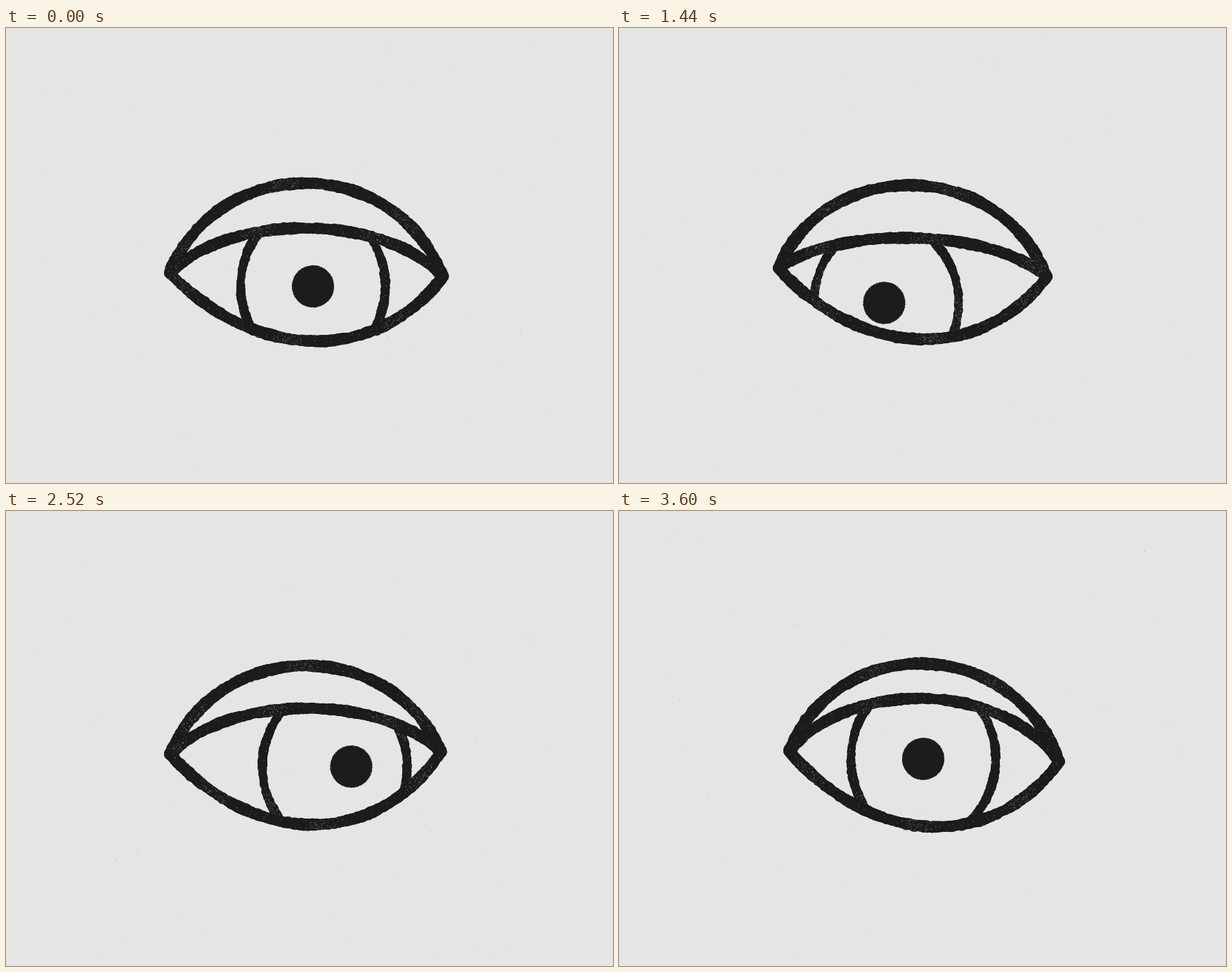
Write an HTML page with a canvas that moves like this. It is 864x648 px and loops after 3780 ms.

```html
<!DOCTYPE html>
<html lang="en">
<head>
<meta charset="utf-8">
<title>Eye</title>
<style>
  html, body { margin: 0; width: 100%; height: 100%; overflow: hidden; background: #e5e5e5; }
  canvas { display: block; }
</style>
</head>
<body>
<canvas id="stage" width="864" height="648"></canvas>
<script>
const ctx = document.getElementById('stage').getContext('2d');
const STEP = 180, COUNT = 21;
const INK = '#1c1c1c', PAPER = '#e5e5e5';

// Key poses: lid height, pupil and the two corners; all else follows from them
const poses = [
  { at: 0, lid: 285, pupil: [437, 368], left: [233, 349], right: [622, 354] },
  { at: 3, lid: 261, pupil: [399, 347], left: [227, 352], right: [619, 350] },
  { at: 6, lid: 344, pupil: [397, 432], left: [232, 347], right: [609, 356] },
  { at: 10, lid: 254, pupil: [358, 351], left: [221, 337], right: [609, 353] },
  { at: 12, lid: 292, pupil: [467, 374], left: [228, 342], right: [622, 341] },
  { at: 16, lid: 270, pupil: [516, 354], left: [239, 351], right: [616, 346] },
  { at: 20, lid: 267, pupil: [433, 353], left: [242, 342], right: [627, 357] }
];

function random(seed) {
  let s = seed * 7919 + 17;
  return () => {
    s = (s + 0x6D2B79F5) | 0;
    let t = Math.imul(s ^ (s >>> 15), 1 | s);
    t = (t + Math.imul(t ^ (t >>> 7), 61 | t)) ^ t;
    return ((t ^ (t >>> 14)) >>> 0) / 4294967296;
  };
}

function poseAt(n) {
  const i = Math.max(1, poses.findIndex(p => p.at >= n));
  const a = poses[i - 1], b = poses[i];
  const t = (n - a.at) / (b.at - a.at);
  const k = t * t * (3 - 2 * t);
  const mix = (u, v) => u + (v - u) * k;
  const mixPoint = key => a[key].map((v, d) => mix(v, b[key][d]));
  return {
    lid: mix(a.lid, b.lid),
    pupil: mixPoint('pupil'), left: mixPoint('left'), right: mixPoint('right')
  };
}

// Bezier arch from corner to corner with its middle at height y;
// fa and fb set how far in the handles stand
function arch([x0, y0], [x1, y1], y, fa, fb) {
  const w = x1 - x0, handle = y + (y - (y0 + y1) / 2) / 3;
  const bezier = (t, a, b, c, d) => {
    const u = 1 - t;
    return u * u * u * a + 3 * u * u * t * b + 3 * u * t * t * c + t * t * t * d;
  };
  return Array.from({ length: 241 }, (_, i) => {
    const t = i / 240;
    return [bezier(t, x0, x0 + fa * w, x1 - fb * w, x1), bezier(t, y0, handle, handle, y1)];
  });
}

const oval = (x, y, rx, ry) => Array.from({ length: 360 }, (_, i) => {
  const a = i * Math.PI / 180;
  return [x + rx * Math.cos(a), y + ry * Math.sin(a)];
});

function blob(x, y, r) {
  ctx.beginPath();
  ctx.arc(x, y, r, 0, 7);
  ctx.fill();
}

function trace(line) {
  ctx.beginPath();
  line.forEach(p => ctx.lineTo(...p));
}

// Dry marker stroke: round stamps of uneven size with patches of grain
function marker(line, width, rnd) {
  const phase = rnd() * 6;
  ctx.fillStyle = INK;
  line.forEach(([x, y], i) => {
    const r = width / 2 + 0.5 * Math.sin(i * 0.13 + phase) + (rnd() - 0.5) * 1.3;
    blob(x + rnd() - 0.5, y + rnd() - 0.5, r);
  });
  ctx.fillStyle = 'rgba(229,229,229,.3)';
  line.forEach(([x, y], i) => {
    const dots = Math.sin(i * 0.07 + phase * 2) > 0.75 ? 3 : 0.3;
    for (let k = rnd(); k < dots; k++) {
      ctx.fillRect(x + (rnd() - 0.5) * width, y + (rnd() - 0.5) * width, 1.2, 1.2);
    }
  });
}

function dust(rnd) {
  for (let i = 0; i < 60; i++) {
    ctx.fillStyle = `rgba(60,60,60,${0.04 + 0.14 * rnd()})`;
    blob(30 + rnd() * 780, 8 + rnd() * 632, 0.5 + rnd() * 0.5);
  }
}

function draw(n) {
  const rnd = random(n + 1);
  const { lid, pupil: [px, py], left, right } = poseAt(n);

  // The whole eye flattens a little as the lid comes down
  const drop = (lid - 270) * 0.2;
  const browLine = arch(left, right, 218 + drop, 0.18, 0.18);
  const lidLine = arch(left, right, lid, 0.22, 0.22);
  const rimLine = arch(left, right, 449 - drop, 0.32, 0.24);

  // The iris trails the pupil, more so to the right
  const shift = px - 437;
  const irisX = 437 + shift * (shift < 0 ? 0.95 : 0.57);

  ctx.fillStyle = PAPER;
  ctx.fillRect(0, 0, 864, 648);
  dust(rnd);

  ctx.save();
  trace([...lidLine, ...rimLine.slice().reverse()]);
  ctx.clip();
  marker(oval(irisX, py, 103, 115), 12.5, rnd);
  ctx.fillStyle = INK;
  trace(oval(px, py, 30, 30).map(([x, y]) => [x + rnd() - 0.5, y + rnd() - 0.5]));
  ctx.fill();
  ctx.restore();

  marker(browLine, 16.5, rnd);
  marker(lidLine, 16, rnd);
  marker(rimLine, 16, rnd);
}

let shown = -1;
const start = performance.now();
function tick() {
  const n = Math.floor((performance.now() - start) / STEP) % COUNT;
  if (n !== shown) draw(shown = n);
  requestAnimationFrame(tick);
}
tick();
</script>
</body>
</html>
```
